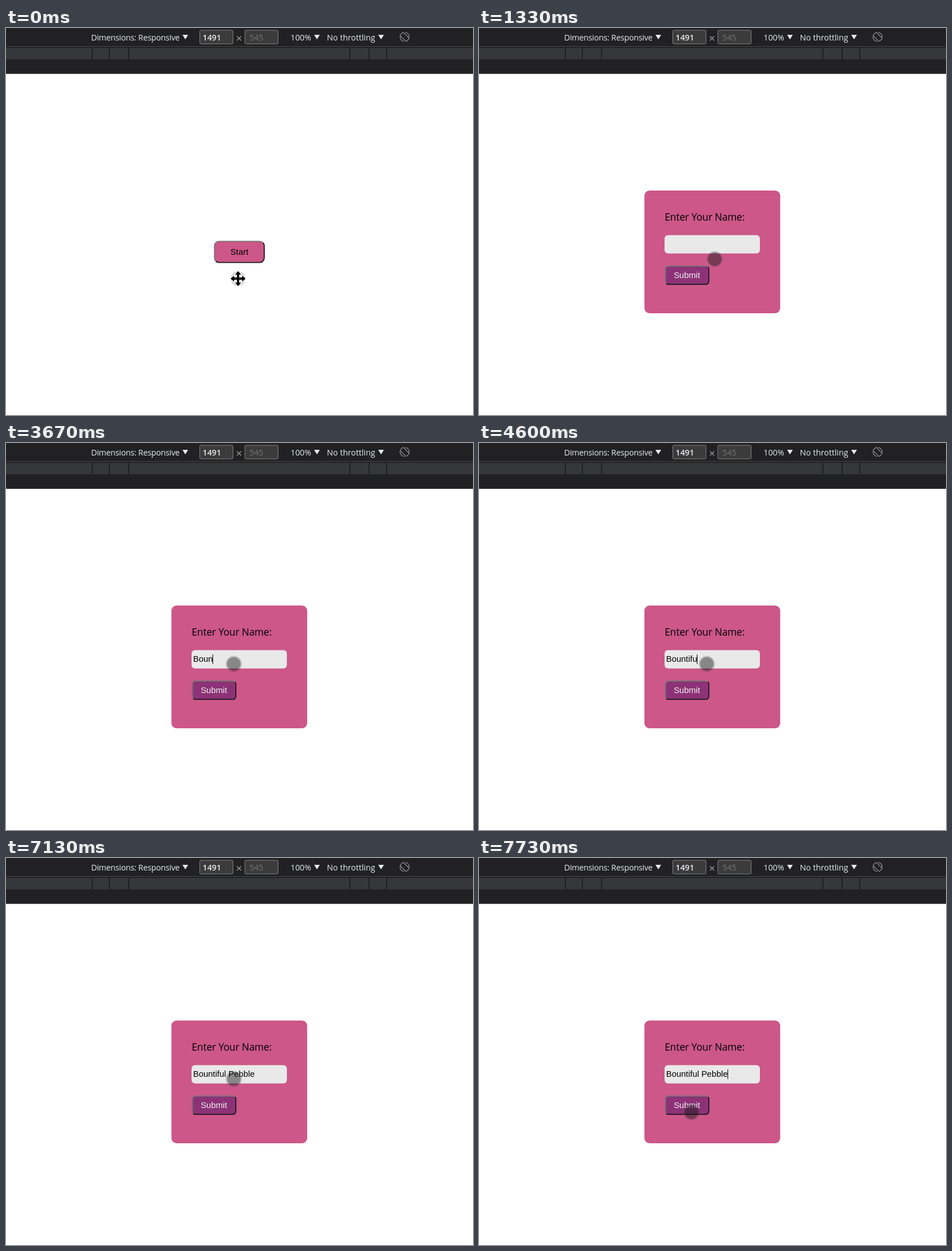
These frames come from a looping animation (823x681 px, 8 s). An HTML page:

```html
<!DOCTYPE html>
<html lang="en">
<head>
<meta charset="utf-8">
<title>Name form</title>
<style>
  html, body { margin: 0; width: 100%; height: 100%; overflow: hidden; background: #fff; }
  svg { display: block; }
  text { white-space: pre; }
  .bar { font: 14.3px "Open Sans", "Noto Sans", sans-serif; fill: #e8eaed; }
  .ui { font: 14.9px "Liberation Sans", Arial, sans-serif; }
  .label { font: 17.4px "Open Sans", "Noto Sans", sans-serif; letter-spacing: -.12px; }
</style>
</head>
<body>
<svg width="823" height="681" viewBox="0 0 823 681">
  <defs>
    <path id="arm" d="M-2 0V-7H-5L-1 -12.5H1L5 -7H2V0Z"/>
    <g id="arms">
      <use href="#arm"/><use href="#arm" transform="rotate(90)"/>
      <use href="#arm" transform="rotate(180)"/><use href="#arm" transform="rotate(270)"/>
    </g>
    <radialGradient id="halo">
      <stop offset=".78" stop-color="#222" stop-opacity=".36"/>
      <stop offset="1" stop-color="#444" stop-opacity=".12"/>
    </radialGradient>
    <path id="drop" d="M0 12h10l-5 8z"/>
  </defs>

  <!-- toolbar and ruler -->
  <rect width="823" height="80.7" fill="#212123"/>
  <rect y="32" width="823" height="1" fill="#48494c"/>
  <rect y="35" width="823" height="20" fill="#36373a"/>
  <path d="M152 34V55M182 34V55M216 34V55M606 34V55M640 34V55M671 34V55" stroke="#202023" stroke-width="2"/>
  <g fill="#3b3b3b" stroke="#858585">
    <rect x="341.5" y="4" width="58.5" height="24" rx="2"/>
    <rect x="421" y="4" width="58.5" height="24" rx="2"/>
  </g>
  <g class="bar">
    <text x="150" y="22" letter-spacing="-.27">Dimensions: Responsive</text>
    <text x="346.5" y="22" font-weight="600">1491</text>
    <text x="429" y="22" style="fill:#757575">545</text>
    <text x="501.5" y="22">100%</text>
    <text x="565.5" y="22">No throttling</text>
    <use href="#drop" x="311"/><use href="#drop" x="543"/><use href="#drop" x="656"/>
  </g>
  <path d="M407 14.5l7.5 7.5M414.5 14.5l-7.5 7.5" stroke="#9a9a9a" stroke-width="1.4"/>
  <g transform="translate(702.5 15.7) rotate(45)" fill="none" stroke="#a2a2a2" stroke-width="1.1">
    <rect x="-7.8" y="-4" width="15.6" height="8" rx="1.5"/>
    <path d="M-5 -6.3A8 8 0 0 1 6.5 -4.8M5 6.3A8 8 0 0 1 -6.5 4.8"/>
  </g>

  <g id="start">
    <g data-bevel="367.4 375.4 87.7 37.2 8" fill="#cc5789"></g>
    <text class="ui" x="395.6" y="398.5">Start</text>
  </g>

  <g id="form">
    <rect x="291.5" y="286" width="239.3" height="216" rx="9" fill="#cc5788"/>
    <text class="label" x="327.3" y="339">Enter Your Name:</text>
    <rect x="327" y="364.5" width="168" height="32.3" rx="6" fill="#e9e9e9"/>
    <text class="ui" id="name" x="329.8" y="385.3"></text>
    <rect id="caret" y="372" width="1" height="17"/>
    <g data-bevel="328.4 418.9 76.7 32.2 5.5" fill="#8d3277"></g>
    <text class="ui" x="343.2" y="439.6" fill="#f0f0f0">Submit</text>
  </g>

  <g id="move">
    <circle r="13" opacity=".16"/>
    <use href="#arms" stroke="#fff" stroke-width="2"/>
    <use href="#arms"/>
  </g>
  <g id="dot">
    <circle r="14.5" cy=".3" fill="url(#halo)"/>
    <circle r="11.5" opacity=".16"/>
  </g>
</svg>
<script>
const LOOP = 8000, FRAME = 1000 / 15, OPEN = 1330, FOCUS = 2290, BLINK = 500;
const NAME = "Bountiful Pebble";
const $ = id => document.getElementById(id);

// Pointer strokes: start, duration, dx, dy
const strokes = [
  [0, 130, 10, -15], [200, 130, -1, -17], [1270, 60, -2.5, -2.5],
  [1730, 330, -14, -18], [7400, 330, -27, 58.5]
];

// Bursts of typing: first key, gap, letters
const bursts = [[3060, 330, 2], [3410, 250, 5], [4590, 200, 3], [5520, 0, 1], [6080, 135, 5]];
const keys = bursts.flatMap(([first, gap, n]) => Array.from({ length: n }, (_, i) => first + i * gap));

const easeOut = p => 1 - (1 - p) ** 2;
const progress = (t, start, time) => easeOut(Math.min(1, Math.max(0, (t - start) / time)));

function pointer(t) {
  let x = 409, y = 441;
  for (const [start, time, dx, dy] of strokes) {
    const p = progress(t, start, time);
    x += dx * p;
    y += dy * p;
  }
  return `translate(${x} ${y})`;
}

// Rounded button with a light upper-left and a dark lower-right edge
function bevel(g) {
  const [x, y, w, h, r] = g.dataset.bevel.split(" ").map(Number);
  const k = r * (1 - Math.SQRT1_2), R = x + w, B = y + h;
  const arc = (ax, ay) => `A${r} ${r} 0 0 1 ${ax} ${ay}`;
  const edge = (d, color) => `<path d="${d}" fill="none" stroke="${color}" stroke-width="1.8"/>`;
  g.innerHTML = `<rect x="${x}" y="${y}" width="${w}" height="${h}" rx="${r}"/>` +
    edge(`M${x + k} ${B - k}${arc(x, B - r)}V${y + r}${arc(x + r, y)}H${R - r}${arc(R - k, y + k)}`, "#777") +
    edge(`M${R - k} ${y + k}${arc(R, y + r)}V${B - r}${arc(R - r, B)}H${x + r}${arc(x + k, B - k)}`, "#1c1a1c");
}
document.querySelectorAll("[data-bevel]").forEach(bevel);

const pen = document.createElement("canvas").getContext("2d");
pen.font = '14.9px "Liberation Sans", Arial, sans-serif';

const show = (id, on) => $(id).setAttribute("display", on ? "inline" : "none");

function draw() {
  const t = Math.floor((performance.now() % LOOP + 4) / FRAME) * FRAME;
  const open = t >= OPEN;
  const count = keys.filter(k => k <= t).length;
  const typed = NAME.slice(0, count);
  const idle = t - (count ? keys[count - 1] : FOCUS);

  show("start", !open);
  show("form", open);
  show("move", !open);
  show("dot", open);
  $(open ? "dot" : "move").setAttribute("transform", pointer(t));

  $("name").textContent = typed;
  $("caret").setAttribute("x", Math.floor(329.6 + pen.measureText(typed).width));
  show("caret", idle >= 0 && idle % (2 * BLINK) < BLINK);
  requestAnimationFrame(draw);
}
draw();
</script>
</body>
</html>
```
